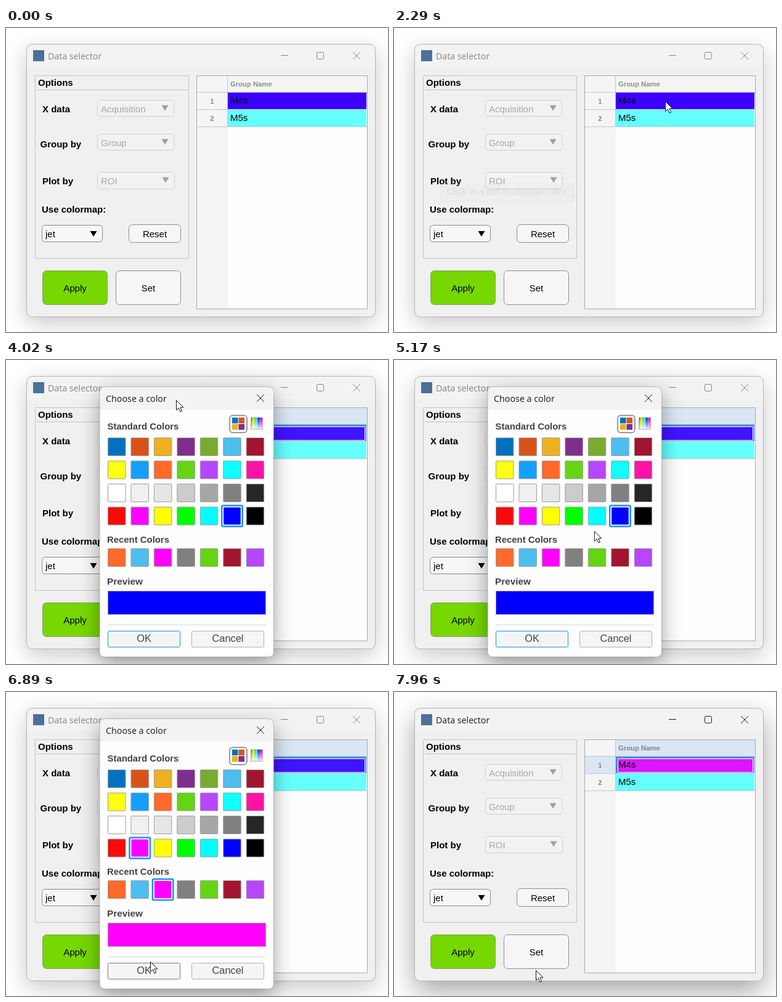
Write an HTML page with a canvas that moves like this. It is 620 by 494 pixels and loops after 8000 ms.

```html
<!DOCTYPE html>
<html lang="en">
<head>
<meta charset="utf-8">
<title>Data selector</title>
<style>
html, body { margin: 0; width: 620px; height: 494px; overflow: hidden; background: #fff; }
canvas { display: block; }
</style>
</head>
<body>
<canvas id="stage" width="620" height="494"></canvas>
<script>
const g = document.getElementById('stage').getContext('2d');
const LOOP = 8000;
const SANS = '"Liberation Sans", Arial, sans-serif';
const TITLE = '"Open Sans", "Noto Sans", sans-serif';

const PALETTE = [
  '#0072bd #d95319 #edb120 #7e2f8e #77ac30 #4dbeee #a2142f',
  '#ffff11 #139fff #ff6929 #64d413 #b746ff #0fffff #ff13a6',
  '#ffffff #f0f0f0 #e6e6e6 #cccccc #a6a6a6 #808080 #262626',
  '#f80a0a #ff00ff #ffff00 #00ff00 #00ffff #0000ff #000000'
].map(row => row.split(' '));
const RECENT = '#ff6929 #4dbeee #ff00ff #808080 #64d413 #a2142f #b746ff'.split(' ');

// Pointer paths: [time, x, y] with holds between moves
const PATH = [
  [1190, 569, 322], [1950, 438, 125], [2020, 438, 125], [2220, 440, 119],
  [2740, 440, 119], [2810, 436, 117], [4019, 436, 117], [4020, 276, 65],
  [4090, 276, 65], [4220, 350, 365], [4490, 350, 365], [4910, 325, 278],
  [5170, 325, 278], [5300, 300, 262], [5500, 245, 244], [5710, 219, 252],
  [6260, 219, 252], [6750, 236, 468], [6820, 236, 468], [6890, 234, 438],
  [6950, 234, 438], [7160, 230, 452], [8000, 230, 452]
];
const CLICKS = [[2350, 2410], [5980, 6120], [7630, 7700]];
const ARROW = new Path2D('M.5 .5V16.5L4.3 13 7 19.2 9.6 18 7 12H12Z');
const HAND = new Path2D('M-2 1.5q2-3 4 0v6q2.5-1 3 1q2.5-1 3 1q2-.5 2 2v5q0 3-2 5v1h-8v-2l-6-7q-1-3 1.5-2.5l2.5 3z');

const between = (t, a, b) => t >= a && t < b;

function box(x, y, w, h, fill, stroke, r = 0, line = 1) {
  g.beginPath();
  g.roundRect(x, y, w, h, r);
  if (fill) { g.fillStyle = fill; g.fill(); }
  if (stroke) { g.strokeStyle = stroke; g.lineWidth = line; g.stroke(); }
}

function text(s, x, y, { color = '#000', size = 15, bold = false, font = SANS, align = 'left' } = {}) {
  g.font = `${bold ? 'bold ' : ''}${size}px ${font}`;
  g.fillStyle = color;
  g.textAlign = align;
  g.fillText(s, x, y);
}

function lines(color, ...segments) {
  g.beginPath();
  for (const [x1, y1, x2, y2] of segments) { g.moveTo(x1, y1); g.lineTo(x2, y2); }
  g.strokeStyle = color;
  g.lineWidth = 1;
  g.stroke();
}

function cross(x, y, color) {
  lines(color, [x, y, x + 12, y + 12], [x + 12, y, x, y + 12]);
}

function shadowed(color, blur, dy, draw) {
  g.save();
  g.shadowColor = color;
  g.shadowBlur = blur;
  g.shadowOffsetY = dy;
  draw();
  g.restore();
}

function dropdown(label, x, y, w, h, on) {
  box(x, y, w, h, on ? '#f7f7f7' : '#f2f2f2', on ? '#8a8a8a' : '#cfcfcf', 5);
  text(label, x + 5.5, y + 19, { color: on ? '#000' : '#a6a6a6' });
  const tx = x + w - 20, ty = y + (on ? 9.5 : 8);
  g.beginPath();
  g.moveTo(tx, ty); g.lineTo(tx + 11, ty); g.lineTo(tx + 5.5, ty + 9);
  g.fillStyle = on ? '#000' : '#a0a0a0';
  g.fill();
}

function button(label, x, y, w, h, fill = '#f6f6f6', stroke = '#8e8e8e') {
  box(x, y, w, h, fill, stroke, 6);
  text(label, x + w / 2, y + h / 2 + 6, { align: 'center' });
}

function frameWindow(active) {
  const shade = active ? ['rgba(0,0,0,.36)', 44, 16] : ['rgba(0,0,0,.22)', 36, 10];
  shadowed(...shade, () => box(33.5, 26.5, 566, 443, '#f0f0f0', null, 9));
  box(33.5, 26.5, 566, 37.5, '#f3f3f3', null, [9, 9, 0, 0]);
  box(33.5, 26.5, 566, 443, null, '#b4b4b4', 9);
  box(44, 36, 18, 18, '#4a7198');
  const ink = active ? '#1a1a1a' : '#858585';
  text('Data selector', 68, 51, { color: ink, size: 14.2, font: TITLE });
  lines(ink, [446, 44.5, 458, 44.5]);
  box(504.5, 39.5, 11, 11, null, ink, 2);
  cross(563, 39, ink);
}

function options() {
  box(47.5, 77.5, 249, 297, null, '#c4c4c4');
  lines('#c4c4c4', [50, 100.5, 295, 100.5]);
  const bold = { bold: true };
  text('Options', 52, 94, bold);
  text('X data', 59, 137, bold);
  text('Group by', 55.5, 194, bold);
  text('Plot by', 59, 254, bold);
  text('Use colormap:', 58, 300, bold);
  dropdown('Acquisition', 148.5, 117.5, 124, 26);
  dropdown('Group', 148.5, 172.5, 124, 26);
  dropdown('ROI', 148.5, 234.5, 125, 27);
  dropdown('jet', 58.5, 320.5, 98, 27, true);
  button('Reset', 199.5, 319.5, 84, 29);
  button('Apply', 59.5, 394.5, 105, 55, '#77d700', '#8b9c78');
  button('Set', 178.5, 394.5, 105, 55);
}

function table(selected, magenta) {
  const mark = selected ? '#dae6f3' : '#f5f5f5';
  box(309.5, 77.5, 277, 379, '#fefefe');
  box(310, 78, 50, 378, '#f5f5f5');
  box(360, 78, 226, 27, mark);
  if (selected) box(310, 105, 50, 27, mark);
  box(360, 105, 225, 27, selected ? '#3d8ee3' : '#3c00ff');
  if (selected) box(363.5, 108.5, 219, 22, magenta ? '#dc14ff' : '#3f14ff', '#fff');
  box(360, 133, 225, 27, '#66ffff');
  lines('#c6c6c6', [310, 104.5, 586, 104.5], [310, 132.5, 360, 132.5],
    [310, 160.5, 586, 160.5], [359.5, 78, 359.5, 160]);
  box(309.5, 77.5, 277, 379, null, '#a9a9a9');
  const head = { bold: true, size: 11.3, color: selected ? '#7e8387' : '#82957f' };
  text('Group Name', 364, 95, head);
  ['M4s', 'M5s'].forEach((name, i) => {
    const y = 123 + 28 * i;
    text(i + 1, 334.5, y, { ...head, color: '#858b74', align: 'center' });
    text(name, 364, y);
  });
}

function tooltip(alpha) {
  g.save();
  g.globalAlpha = alpha;
  shadowed('rgba(0,0,0,.25)', 3, 1, () => box(76.5, 252.5, 215, 29, '#fff', '#b4b4b4', 4));
  g.beginPath();
  g.moveTo(291, 259); g.lineTo(302, 266); g.lineTo(291, 273);
  g.fillStyle = '#fff';
  g.fill();
  g.strokeStyle = '#b8b8b8';
  g.lineWidth = 1.5;
  g.stroke();
  text('Click in a cell to change color.', 85, 271);
  g.restore();
}

function swatches(colors, y, chosen) {
  colors.forEach((c, i) => {
    const x = 165.5 + 37.45 * i;
    box(x, y, 28.5, 29, c, i === chosen ? '#fff' : '#9c9c9c', 1);
    if (i === chosen) box(x - 2.5, y - 2.5, 33.5, 34, null, '#1593f5', 2, 2.5);
  });
}

function modeIcons() {
  box(363, 90, 28, 28, '#fff', '#9a9a9a', 5, 2);
  ['#0072bd', '#d95319', '#edb120', '#7e2f8e'].forEach((c, i) =>
    box(367 + 10.5 * (i % 2), 93.5 + 10.5 * (i >> 1), 9.5, 9.5, c));
  const hues = g.createLinearGradient(398, 0, 416, 0);
  for (let i = 0; i <= 6; i++) hues.addColorStop(i / 6, `hsl(${60 * i} 100% 50%)`);
  box(397.5, 93.5, 19, 19, hues, '#b0b0b0');
  const fade = g.createLinearGradient(0, 94, 0, 112);
  fade.addColorStop(0, 'rgba(255,255,255,0)');
  fade.addColorStop(1, 'rgba(255,255,255,.9)');
  box(398, 94, 18, 18, fade);
}

function dialog(picked) {
  shadowed('rgba(0,0,0,.36)', 32, 10, () => box(152, 43.5, 282.5, 439, '#fefefe', null, 8));
  box(152, 43.5, 282.5, 37.5, '#f3f3f3', null, [8, 8, 0, 0]);
  box(152, 43.5, 282.5, 439, null, 'rgba(120,120,120,.45)', 8);
  text('Choose a color', 162, 68, { color: '#1a1a1a', size: 14.3, font: TITLE });
  cross(407, 56, '#1a1a1a');
  modeIcons();
  const head = { bold: true, size: 14.9, color: '#404048' };
  text('Standard Colors', 164.5, 113, head);
  text('Recent Colors', 164, 297, head);
  text('Preview', 164, 365, { ...head, size: 15.3 });
  PALETTE.forEach((row, i) =>
    swatches(row, 126.5 + 37.5 * i, i < 3 ? -1 : picked ? 1 : 5));
  swatches(RECENT, 306.5, picked ? 2 : -1);
  box(165.5, 375.5, 256, 38, picked ? '#ff00ff' : '#0000ff', '#a0a0a0');
  lines('#d8d8d8', [165, 430.5, 422, 430.5]);
  box(165.5, 440.5, 117, 26, '#f5f5f5', picked ? '#7c7c7c' : '#1593e8', 2);
  box(301.5, 440.5, 117, 26, '#f5f5f5', '#b0b0b0', 2);
  const label = { size: 16.4, color: '#444', align: 'center' };
  text('OK', 224, 458, label);
  text('Cancel', 360, 458, label);
}

function pointer(t) {
  const i = PATH.findIndex(p => p[0] > t);
  if (i === 0) return;
  const [t0, x0, y0] = PATH[i - 1], [t1, x1, y1] = PATH[i];
  const k = (t - t0) / (t1 - t0);
  const x = x0 + (x1 - x0) * k, y = y0 + (y1 - y0) * k;
  if (CLICKS.some(([a, b]) => between(t, a, b))) {
    g.beginPath();
    g.arc(x - 2, y + 1, 15, 0, 7);
    g.fillStyle = 'rgba(249,118,130,.95)';
    g.fill();
  }
  const overSwatch = t > 5170 && t < 6750 && between(y, 239, 269) && (x - 165) % 37.45 < 29;
  const shape = overSwatch ? HAND : ARROW;
  g.save();
  g.translate(x, y);
  g.fillStyle = overSwatch ? '#fffbe0' : '#fff';
  g.strokeStyle = '#111';
  g.lineWidth = 1;
  g.lineJoin = 'round';
  g.fill(shape);
  g.stroke(shape);
  g.restore();
}

function draw(now) {
  const t = now % LOOP;
  g.fillStyle = '#fff';
  g.fillRect(0, 0, 620, 494);
  frameWindow(between(t, 2410, 4020) || t >= 7830);
  options();
  table(t >= 2410, t >= 7760);
  if (between(t, 2260, 4020)) tooltip(Math.min(1, Math.max(.08, (t - 2280) / 190)));
  if (between(t, 4020, 7760)) dialog(t >= 6060);
  pointer(t);
}

const start = performance.now();
function tick() {
  draw(performance.now() - start);
  requestAnimationFrame(tick);
}
tick();
</script>
</body>
</html>
```
